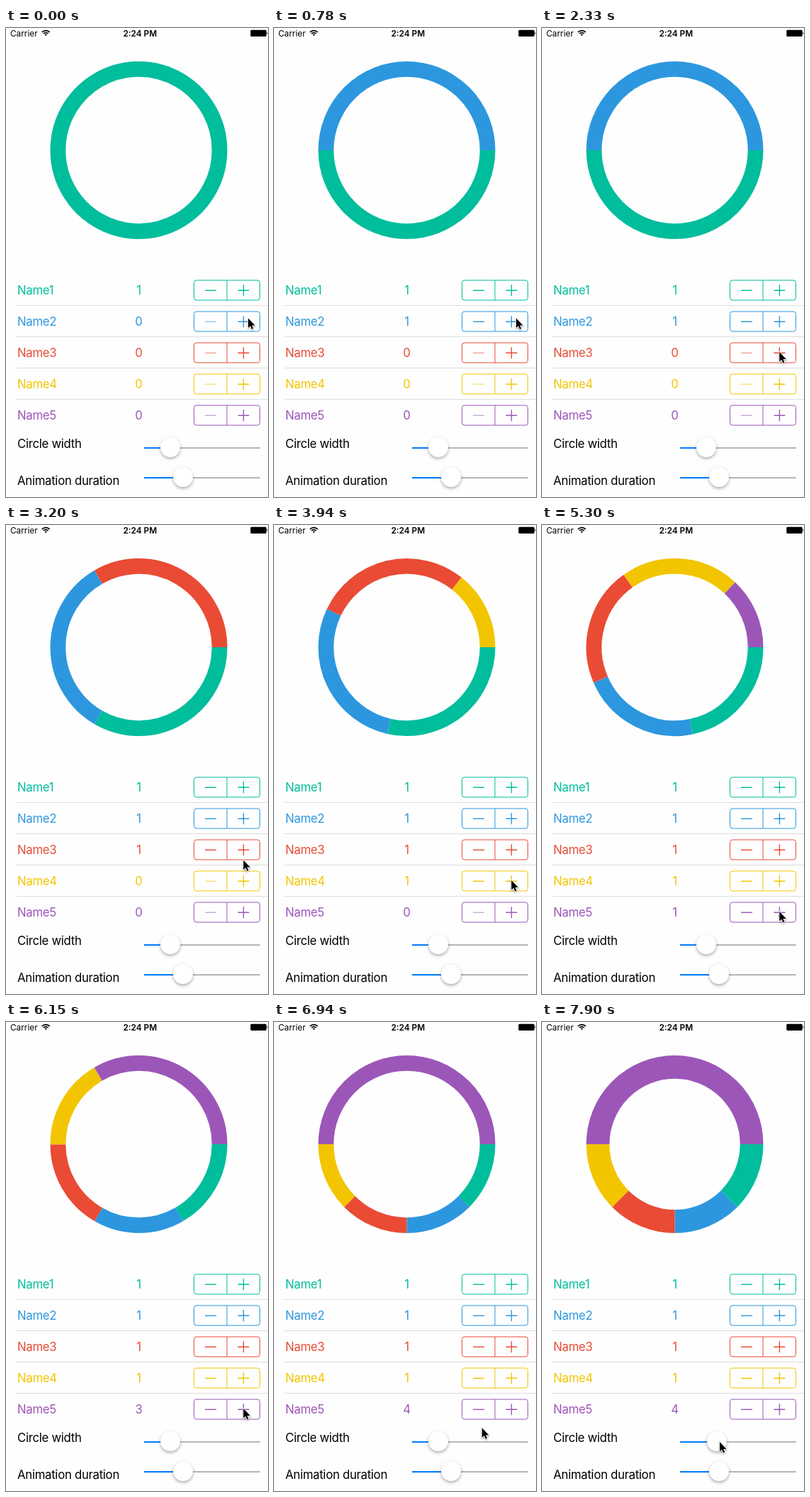
Recreate the animation shown at these times as an HTML page. Size 370x660 px, loop 7990 ms.

```html
<!DOCTYPE html>
<html lang="en">
<head>
<meta charset="utf-8">
<title>Ring chart</title>
<style>
  html, body { margin: 0; width: 100%; height: 100%; overflow: hidden; background: #fefefe; }
  svg { display: block; width: 370px; height: 660px; }
  text { font: 16.8px Inter, sans-serif; letter-spacing: -.3px; }
  .status { font-size: 11.8px; letter-spacing: 0; }
  .bold { font-weight: 600; }
  .middle { text-anchor: middle; }
  .knob { fill: #fff; filter: drop-shadow(0 2px 2px #0005); }
  #cursor { stroke: #fff; stroke-width: 1.6; paint-order: stroke; filter: drop-shadow(0 1px 1px #0006); }
</style>
</head>
<body>
<svg viewBox="0 0 370 660">
  <text class="status" x="6" y="11.5">Carrier</text>
  <g fill="none" stroke="#000" stroke-width="1.7">
    <path d="M50.8 5.8a7.7 7.7 0 0 1 10.9 0M52.9 8a4.7 4.7 0 0 1 6.7 0"/>
    <path d="M54.6 9.2a2.4 2.4 0 0 1 3.3 0L56.3 11.2Z" fill="#000" stroke="none"/>
  </g>
  <text class="status bold middle" x="189.3" y="11.5">2:24 PM</text>
  <rect x="345.3" y="2.7" width="22.4" height="9.2" rx="1.5"/>
  <path d="M368.4 5.5q1.8 1.8 0 3.6z"/>
  <g id="ring" fill="none"></g>
  <g id="rows"></g>
  <text x="16" y="591">Circle width</text>
  <text x="16" y="642.5">Animation duration</text>
  <g id="sliders"></g>
  <path id="cursor" d="M0 0V13.6L3.1 10.7 5.1 15.4 7.2 14.5 5.2 9.9H9.6Z"/>
</svg>
<script>
const LOOP = 7990;
const PRESS_TIME = 300;
const COLORS = ['#00bd9c', '#2c97de', '#e94b35', '#f2c500', '#9c56b8'];
const rowY = row => 369 + 44 * row;
const plusButton = row => ({ x: 335.3, y: rowY(row) - 1 });

const presses = [
  { at: 470, row: 1 }, { at: 2620, row: 2 }, { at: 3824, row: 3 },
  ...[5165, 5640, 6150, 6630].map(at => ({ at, row: 4 }))
];
const cursorStart = { x: 342, y: rowY(1) - 4.5 };
const moves = [
  ...[2, 3, 4].map((row, i) => ({ at: [1720, 3060, 4180][i], time: 610, to: plusButton(row) })),
  { at: 6860, time: 250, to: { x: 250, y: 600 } },
  { at: 7120, time: 310, to: { x: 236, y: 591 } }
];
const drag = { at: 7670, time: 230, distance: 15 };

const $ = selector => document.querySelector(selector);
const mix = (a, b, p) => a + (b - a) * p;
const progress = (t, start, time) => Math.min(1, Math.max(0, (t - start) / time));
const easeOut = p => Math.sin(p * Math.PI / 2);

$('#ring').innerHTML = COLORS.map(c => `<path stroke="${c}"/>`).join('');

$('#rows').innerHTML = COLORS.map((c, i) => `
  <g transform="translate(0 ${rowY(i)})">
    <text x="16" y="5.8" fill="${c}">Name${i + 1}</text>
    <text class="count middle" x="187.5" y="5.8" fill="${c}"></text>
    <g fill="none" stroke="${c}">
      <rect x="265.5" y="-14" width="93" height="28" rx="3.5"/>
      <path d="M312 -14V14"/>
      <path class="minus" d="M281 .3H297" stroke-width="1.4"/>
      <path d="M327.4 .3H343.4M335.4 -7.7V8.3" stroke-width="1.4"/>
    </g>
    ${i < 4 ? '<path d="M15 21.5H370" stroke="#dcdcde"/>' : ''}
  </g>`).join('');

$('#sliders').innerHTML = [[232, 591], [250, 633]].map(([x, y]) => `
  <path d="M195 ${y}H359" stroke="#b6b6b6" stroke-width="2"/>
  <path class="fill" d="M195 ${y}H${x}" stroke="#007aff" stroke-width="2"/>
  <circle class="knob" cx="${x}" cy="${y - 1}" r="14"/>`).join('');

const arcs = [...$('#ring').children];
const counts = document.querySelectorAll('.count');
const minuses = document.querySelectorAll('.minus');

function arcPath(from, sweep, r) {
  const point = degrees => {
    const a = degrees * Math.PI / 180;
    return `${187.5 + r * Math.cos(a)} ${172 + r * Math.sin(a)}`;
  };
  const end = from + Math.min(sweep, 359.99);
  return `M${point(from)}A${r} ${r} 0 ${+(sweep > 180)} 1 ${point(end)}`;
}

function chartAt(t) {
  const values = [1, 0, 0, 0, 0];
  let angles = [360, 0, 0, 0, 0];
  for (const { at, row } of presses) {
    if (t < at) break;
    values[row]++;
    const total = values.reduce((a, b) => a + b);
    const p = easeOut(progress(t, at, PRESS_TIME));
    angles = angles.map((a, i) => mix(a, values[i] / total * 360, p));
  }
  return { values, angles };
}

function cursorAt(t) {
  return moves.reduce(({ x, y }, { at, time, to }) => {
    const p = easeOut(progress(t, at, time));
    return { x: mix(x, to.x, p), y: mix(y, to.y, p) };
  }, cursorStart);
}

function draw() {
  const t = performance.now() % LOOP;
  const { values, angles } = chartAt(t);
  const slide = progress(t, drag.at, drag.time);
  const shift = drag.distance * slide;
  const width = mix(21.8, 32.8, slide);
  let from = 0;
  $('#ring').setAttribute('stroke-width', width);
  arcs.forEach((arc, i) => {
    arc.setAttribute('d', angles[i] ? arcPath(from, angles[i], 125 - width / 2) : '');
    from += angles[i];
    counts[i].textContent = values[i];
    minuses[i].setAttribute('opacity', values[i] ? 1 : .5);
  });
  $('.knob').setAttribute('cx', 232 + shift);
  $('.fill').setAttribute('d', `M195 591H${232 + shift}`);
  const { x, y } = cursorAt(t);
  $('#cursor').setAttribute('transform', `translate(${x + shift} ${y})`);
  requestAnimationFrame(draw);
}
draw();
</script>
</body>
</html>
```
